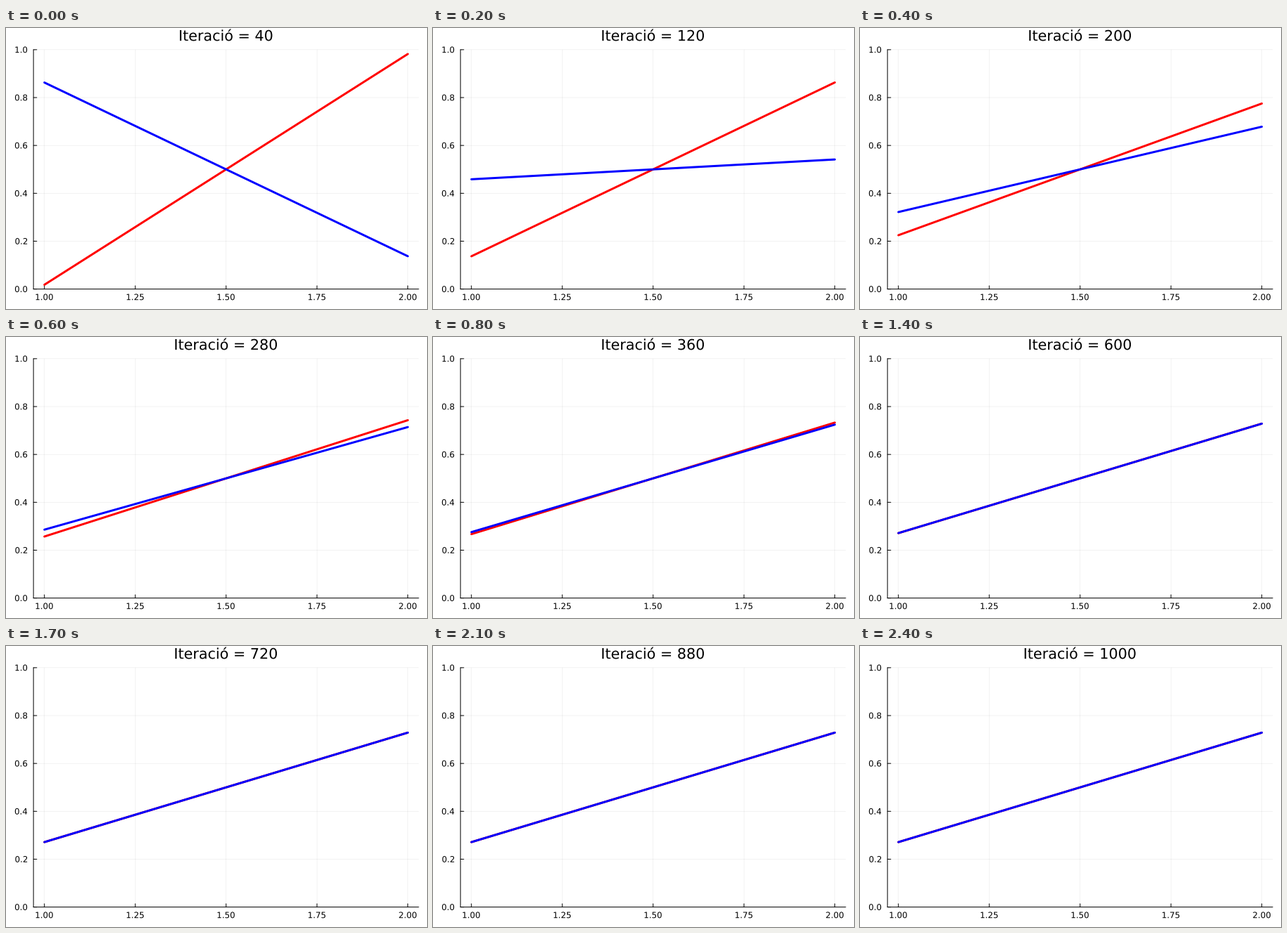
A matplotlib script for the animation above (2.5 s loop, 600 by 400 pixels).

```python
import numpy as np
import matplotlib.pyplot as plt
from matplotlib.animation import FuncAnimation
from matplotlib.patches import PathPatch
from matplotlib.textpath import TextPath
from matplotlib.transforms import Affine2D

W, H, DPI = 600, 400, 100
FRAMES, INTERVAL, STEP = 25, 100, 40
LEFT, RIGHT, TOP, BOTTOM = 39.15, 588.19, 30.87, 371.61
XMIN, XMAX = 0.97, 2.03
TICK, TICK_FONT, TITLE_FONT = 4.72, 11.85, 20.74

plt.rcParams.update({"font.family": "DejaVu Sans", "toolbar": "None"})

# The axes cover the stage in pixels, y pointing down.
fig = plt.figure(figsize=(W / DPI, H / DPI), dpi=DPI, facecolor="white")
ax = fig.add_axes([0, 0, 1, 1], xlim=(0, W), ylim=(H, 0))
ax.axis("off")


def px(x):
    return LEFT + (x - XMIN) / (XMAX - XMIN) * (RIGHT - LEFT)


def py(y):
    return BOTTOM - y * (BOTTOM - TOP)


def stroke(xs, ys, width=1.0, color="black", alpha=1.0):
    return ax.plot(xs, ys, color=color, alpha=alpha, lw=width * 72 / DPI,
                   solid_capstyle="round", snap=False)[0]


def text_path(text, size, x, baseline, align=0.5):
    """Outlined text, aligned by the edges of its ink (0.5 centre, 1 right)."""
    path = TextPath((0, 0), text, size=size)
    box = path.get_extents()
    shift = x - box.x0 - align * box.width
    return Affine2D().scale(1, -1).translate(shift, baseline).transform_path(path)


def write(*args):
    return ax.add_patch(PathPatch(text_path(*args), fc="black", lw=0))


x_ticks, y_ticks = np.linspace(1, 2, 5), np.linspace(0, 1, 6)

for x in px(x_ticks):
    stroke([x, x], [BOTTOM, TOP], 0.5, alpha=0.1)
for y in py(y_ticks):
    stroke([LEFT, RIGHT], [y, y], 0.5, alpha=0.1)

stroke([LEFT, RIGHT], [BOTTOM, BOTTOM])
stroke([LEFT, LEFT], [BOTTOM, TOP])
for v in x_ticks:
    stroke([px(v)] * 2, [BOTTOM, BOTTOM - TICK])
    write(f"{v:.2f}", TICK_FONT, px(v), BOTTOM + 15.6)
for v in y_ticks:
    stroke([LEFT, LEFT + TICK], [py(v)] * 2)
    write(f"{v:.1f}", TICK_FONT, LEFT - 9, py(v) + 4.32, 1)


def title_path(n):
    return text_path(f"Iteració = {n}", TITLE_FONT, (LEFT + RIGHT) / 2, 18.14)


title = ax.add_patch(PathPatch(title_path(STEP), fc="black", lw=0))
ends = px(np.array([1, 2]))
red = stroke(ends, [0, 0], 3, "#ff0000")
blue = stroke(ends, [0, 0], 3, "#0000ff")


def share(n, a, b):
    """Probability of the first choice; its logit decays to equilibrium."""
    u = np.exp(-0.0152 * (n - STEP))
    return 1 / (1 + np.exp(0.988 - a * u - b * u * u))


def update(i):
    n = STEP * (i + 1)
    for line, p in ((red, share(n, -2.821, -0.192)), (blue, share(n, 2.751, 0.076))):
        line.set_ydata([py(p), py(1 - p)])
    title.set_path(title_path(n))
    return red, blue, title


anim = FuncAnimation(fig, update, frames=FRAMES, init_func=lambda: update(0),
                     interval=INTERVAL, repeat=True, repeat_delay=0)
plt.show()
```
